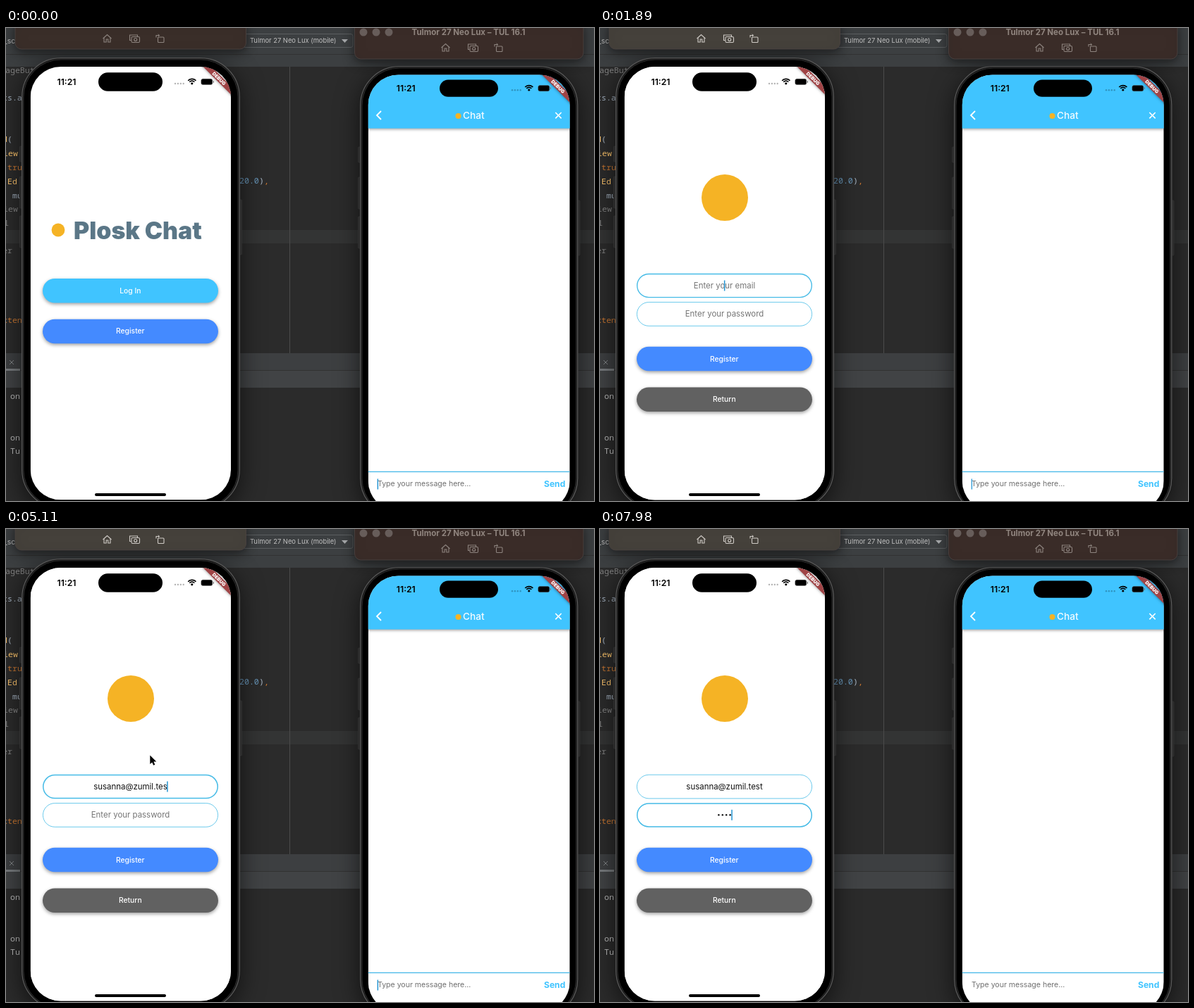
Write an HTML page with a canvas that moves like this. It is 834 px wide and 672 px high and loops after 8000 ms.

```html
<!DOCTYPE html>
<html lang="en">
<head>
<meta charset="utf-8">
<title>Sign-up demo</title>
<style>
html, body { margin: 0; width: 100%; height: 100%; overflow: hidden; background: #2b2b2b; }
canvas { display: block; }
</style>
</head>
<body>
<canvas id="stage" width="834" height="672"></canvas>
<script>
const ctx = document.getElementById('stage').getContext('2d');
const LOOP = 8000, STEP = 70;
const SANS = 'Inter, sans-serif', MONO = '"Noto Sans Mono", monospace';
const SKY = '#40c4ff', BLUE = '#448aff', GREY = '#616161', HINT = '#757575';
const EDGE = '#46bbe6', CARET = '#2495d3', LOGO = '#f5b325';

const DEVICE = 'Tulmor 27 Neo Lux';
const EMAIL = 'susanna@zumil.test';
const EMAIL_KEYS = [2380, 2520, 2660, 2870, 3010, 3290, 3360, 3710, 4060,
  4200, 4340, 4480, 4690, 4900, 4970, 5040, 5110, 5880];
const PASS_KEYS = [7210, 7420, 7700, 7840];
const PRESS = 700, FOCUS_EMAIL = 1750, FOCUS_PASS = 6720;

const clamp = v => Math.max(0, Math.min(1, v));
const ramp = (t, start, span) => clamp((t - start) / span);
const mix = (a, b, p) => a + (b - a) * p;

function bezier(x1, y1, x2, y2) {
  const at = (a, b, s) => 3 * (1 - s) ** 2 * s * a + 3 * (1 - s) * s * s * b + s ** 3;
  return x => {
    let lo = 0, hi = 1;
    for (let i = 0; i < 24; i++) {
      const mid = (lo + hi) / 2;
      if (at(x1, x2, mid) < x) lo = mid; else hi = mid;
    }
    return at(y1, y2, lo);
  };
}
const slideEase = bezier(.35, .91, .33, .97);
const heroEase = bezier(.4, 0, .2, 1);

// Blink cycle: steady, fade out, dark, fade in
function blink(dt) {
  const p = dt % 1065;
  if (p < 510) return 1;
  return p < 875 ? 1 - ramp(p, 510, 120) : ramp(p, 875, 125);
}

function rect(x, y, w, h, color) {
  ctx.fillStyle = color;
  ctx.fillRect(x, y, w, h);
}
function round(x, y, w, h, r, fill, stroke, line = 1) {
  ctx.beginPath();
  ctx.roundRect(x, y, w, h, r);
  if (fill) { ctx.fillStyle = fill; ctx.fill(); }
  if (stroke) { ctx.strokeStyle = stroke; ctx.lineWidth = line; ctx.stroke(); }
}
function disc(x, y, r, color) {
  ctx.beginPath();
  ctx.arc(x, y, r, 0, Math.PI * 2);
  ctx.fillStyle = color;
  ctx.fill();
}
function path(points, color, line, close) {
  ctx.beginPath();
  points.forEach(([x, y]) => ctx.lineTo(x, y));
  if (close) ctx.closePath();
  ctx.strokeStyle = color;
  ctx.lineWidth = line;
  ctx.stroke();
}
// y is the middle of the capitals
function text(str, x, y, size, color, weight = 400, align = 'center', family = SANS) {
  ctx.font = `${weight} ${size}px ${family}`;
  ctx.textAlign = align;
  ctx.fillStyle = color;
  ctx.fillText(str, x, y + size * .36);
}
function shaded(color, blur, dy, draw) {
  ctx.save();
  ctx.shadowColor = color;
  ctx.shadowBlur = blur;
  ctx.shadowOffsetY = dy;
  draw();
  ctx.restore();
}

function code(str, x, y, color) {
  text(str, x, y, 11.6, color, 400, 'left', MONO);
}

function drawEditor() {
  rect(0, 0, 834, 672, '#2b2b2b');
  rect(0, 0, 834, 55, '#3c3f41');
  rect(0, 37, 834, 1, '#323232');
  rect(0, 287, 834, 19, '#333434');
  rect(402, 55, 1, 407, '#4b4b4b');
  rect(0, 462, 834, 24, '#3d3f41');
  rect(0, 486, 834, 1, '#323232');
  rect(0, 487, 834, 24, '#414345');
  round(336, 8.5, 156, 19, 3, '#3c3f41', '#5b5e60');
  text(DEVICE + ' (mobile)', 346, 18, 9.4, '#c0c0c0', 400, 'left');
  ctx.beginPath();
  ctx.moveTo(476, 16);
  ctx.lineTo(485, 16);
  ctx.lineTo(480.5, 21);
  ctx.fillStyle = '#a5a7a9';
  ctx.fill();

  const plain = '#a9b7c6', dim = '#808080', gold = '#ffc66d', orange = '#cc7832';
  text('_sc', -3, 18, 10.5, '#bbbbbb', 400, 'left');
  code('ageBut', -1, 60, dim);
  code('ts.ad', -5, 99, plain);
  code('d', -5, 158, gold);
  code('(', 2, 158, plain);
  code('iew', -4, 178, gold);
  code('tru', 2, 198, orange);
  code('Ed', 2, 218, gold);
  code('mu', 9, 238, plain);
  code('iew', -4, 257, dim);
  code('l', -3, 277, dim);
  code('er', -5, 316, dim);
  code('xten', -5, 415, orange);
  code('20.0', 331, 217, '#6897bb');
  code(')', 359, 217, plain);
  code(',', 366, 217, orange);
  path([[5, 472], [11, 478]], '#808486', 1);
  path([[11, 472], [5, 478]], '#808486', 1);
  rect(0, 484, 20, 3, '#777b7e');
  code('on', 6, 523, '#bbbbbb');
  code('on', 6, 582, '#bbbbbb');
  code('Tu', 6, 601, '#bbbbbb');
}

function toolIcons([a, b, c], y, color) {
  path([[a - 6, y], [a, y - 5.5], [a + 6, y]], color, 1.1);
  path([[a - 4.5, y - 1], [a - 4.5, y + 5], [a - 1.3, y + 5], [a - 1.3, y + 1], [a + 1.3, y + 1],
    [a + 1.3, y + 5], [a + 4.5, y + 5], [a + 4.5, y - 1]], color, 1.1);
  path([[b - 5, y + 2.5], [b - 7, y + 2.5], [b - 7, y - 5], [b + 4, y - 5], [b + 4, y - 3]], color, 1.1);
  round(b - 4.5, y - 2.5, 11.5, 8, 1.5, null, color, 1.1);
  ctx.beginPath();
  ctx.arc(b + 1.2, y + 1.5, 2, 0, 7);
  ctx.stroke();
  round(c - 2.5, y - 2, 8.5, 7.5, 1, null, color, 1.1);
  path([[c - 5, y - 1.5], [c - 5, y - 4.5], [c - .5, y - 4.5]], color, 1.1);
  path([[c - 2.2, y - 6.3], [c - .4, y - 4.5], [c - 2.2, y - 2.7]], color, 1);
}

function drawToolbars(active) {
  const frame = (x, w, h, fill) => shaded('rgba(0,0,0,.55)', 16, 4, () =>
    round(x, -10, w, h + 10, 9, fill, '#4d4542', .8));
  frame(13, 327.5, 30, active ? '#45413b' : '#3a2e29');
  toolIcons([143.5, 182.5, 218], 15, active ? '#cfcbc6' : '#8d847f');
  frame(494.5, 324.5, 44, '#3a2c28');
  for (const x of [507, 525, 543]) disc(x, 6, 5.5, '#675d5a');
  text(DEVICE + ' – TUL 16.1', 656, 6, 11.5, '#90857f', 700);
  toolIcons([623.5, 662.5, 698], 28, '#8d847f');
}

function drawBody(x, y, w, sideY) {
  const key = (kx, ky, h) => round(kx, ky, 3, h, 1, '#3b3b3b', '#505050', .5);
  [[0, 22], [43, 45], [99, 45]].forEach(([dy, h]) => key(x - 2.5, sideY + dy, h));
  key(x + w - .5, sideY + 76, 78);
  shaded('rgba(0,0,0,.6)', 34, 8, () => round(x, y, w, 642, 56, '#1b1b1b'));
  round(x + .7, y + .7, w - 1.4, 640, 55, null, '#5c5c5c', 1.2);
  round(x + 3, y + 3, w - 6, 636, 53, '#000', '#333', .8);
}

function inScreen(x, y, w, h, draw) {
  ctx.save();
  ctx.beginPath();
  ctx.roundRect(x, y, w, h, 43);
  ctx.clip();
  rect(x, y, w, h, '#fff');
  draw();
  banner(x + w, y);
  ctx.restore();
}

function banner(x, y) {
  ctx.save();
  ctx.translate(x, y);
  ctx.rotate(Math.PI / 4);
  shaded('rgba(0,0,0,.5)', 4, 0, () => rect(-32, 19.7, 64, 8.2, '#a04446'));
  text('DEBUG', 0, 23.8, 6.8, '#fff', 900);
  ctx.restore();
}

function statusBar(clockX, y, islandX, islandW, dotsX, dotColor) {
  const islandH = islandW * .291;
  text('11:21', clockX, y, 12.2, '#000', 600);
  round(islandX, y - islandH / 2, islandW, islandH, islandH / 2, '#000');
  for (let i = 0; i < 4; i++) disc(dotsX + i * 3.9, y + 2.5, 1.2, dotColor);
  const wx = dotsX + 23.8, wy = y + 3.5;
  ctx.strokeStyle = '#000';
  ctx.lineWidth = 1.7;
  for (const r of [4.8, 7.6]) {
    ctx.beginPath();
    ctx.arc(wx, wy, r, -Math.PI * .76, -Math.PI * .24);
    ctx.stroke();
  }
  disc(wx, wy - 1.2, 1.6, '#000');
  round(wx + 13, y - 4.2, 16, 8.2, 2.5, '#000', 'rgba(90,90,90,.5)', .8);
  rect(wx + 30, y - 1.6, 1.2, 3, '#777');
}

function button(label, y, color, glow = 0) {
  shaded('rgba(0,0,0,.38)', 5, 2, () => round(52, y, 249, 34.5, 17.25, color));
  if (glow) round(52, y, 249, 34.5, 17.25, `rgba(255,255,255,${glow})`);
  text(label, 176.3, y + 17, 10.3, '#fff', 500);
}

// The outline lies fully inside the field's box
function field(y, focus) {
  const line = mix(.8, 1.5, focus);
  round(52 + line / 2, y + line / 2, 249 - line, 34.5 - line, 17, '#fff', EDGE, line);
}

function caret(x, y, alpha) {
  if (alpha <= 0) return;
  ctx.globalAlpha = alpha;
  rect(x - .6, y - 7.5, 1.5, 15, CARET);
  ctx.globalAlpha = 1;
}

function homePage(t) {
  text('Plosk Chat', 96, 288, 33.9, '#5b7787', 900, 'left');
  button('Log In', 356, SKY);
  button('Register', 413.7, BLUE, .11 * ramp(t, PRESS, 200));
}

function formPage(t) {
  const toPass = ramp(t, FOCUS_PASS, 170);
  const typed = EMAIL_KEYS.filter(k => k <= t);
  const dots = PASS_KEYS.filter(k => k <= t);
  const mid = 176.5, size = 11.45;

  field(348.8, ramp(t, FOCUS_EMAIL, 170) * (1 - toPass));
  let end = mid;
  if (typed.length) {
    const str = EMAIL.slice(0, typed.length);
    text(str, mid, 365.5, size, '#111');
    end += ctx.measureText(str).width / 2;
  } else {
    text('Enter your email', mid, 365.5, size, HINT);
  }
  if (t >= FOCUS_EMAIL && t < FOCUS_PASS) {
    caret(end, 366, blink(t - (typed.at(-1) ?? FOCUS_EMAIL - 20)));
  }

  field(389.2, toPass);
  const gap = 5.4, half = dots.length * gap / 2;
  if (!dots.length) text('Enter your password', mid, 406, size, HINT);
  dots.forEach((_, i) => disc(mid - half + gap * (i + .5), 406.3, 1.2, '#111'));
  if (t >= FOCUS_PASS + 70) {
    caret(mid + half - .4, 406.3, blink(t - (dots.at(-1) ?? FOCUS_PASS + 70)));
  }

  button('Register', 452.8, BLUE);
  button('Return', 510.5, GREY);
}

function drawSignup(t) {
  const slide = slideEase(ramp(t, 850, 450));
  const grow = heroEase(ramp(t, 890, 450));
  const left = 34.7, width = 284.3;
  drawBody(22, 42, 310, 168);
  inScreen(left, 55, width, 615.5, () => {
    if (slide < .999) {
      ctx.save();
      ctx.translate(-width / 3 * slide, 0);
      homePage(t);
      ctx.restore();
    }
    if (slide > 0) {
      ctx.save();
      ctx.translate(width * (1 - slide), 0);
      rect(left, 55, width, 616, '#fff');
      formPage(t);
      ctx.restore();
    }
    // The logo flies along an arc between the pages
    const arc = Math.sin(grow * Math.PI / 2);
    disc(mix(74, 177, arc), mix(287, 241, grow), mix(9.4, 33, grow), LOGO);
  });
  statusBar(86, 76.5, 131, 91, 240, '#b5b5b5');
  round(126, 661, 101, 4, 2, '#000');
}

function drawChat(t) {
  drawBody(502, 54, 309.5, 169);
  inScreen(513.7, 66.4, 286, 620, () => {
    shaded('rgba(0,0,0,.38)', 4, 1.5, () => rect(513, 66, 288, 76.6, SKY));
    path([[532, 118], [526, 124], [532, 130]], '#fff', 1.8);
    disc(641.5, 125, 4, LOGO);
    text('Chat', 648, 124.5, 13.7, '#f4fbff', 500, 'left');
    path([[779.3, 120], [787.7, 128.4]], '#fff', 1.6);
    path([[787.7, 120], [779.3, 128.4]], '#fff', 1.6);
    rect(513, 629.8, 288, 1.3, '#45b8e8');
    text('Type your message here...', 527, 647.3, 10.55, '#707070', 400, 'left');
    text('Send', 763, 647.3, 12.1, SKY, 700, 'left');
    caret(527.2, 648, blink(t + 160));
  });
  statusBar(567.3, 85.7, 615, 83, 718, '#2f93bf');
}

function drawPointer(x, y) {
  const shape = [[0, 0], [0, 12.5], [2.9, 9.9], [4.9, 14.2], [7, 13.2], [5.1, 9.1], [9, 9]];
  const pts = shape.map(([px, py]) => [x + px, y + py]);
  ctx.lineJoin = 'round';
  path(pts, '#fff', 2, true);
  ctx.fillStyle = '#000';
  ctx.fill();
  ctx.lineJoin = 'miter';
}

function draw(t) {
  drawEditor();
  drawSignup(t);
  drawChat(t);
  drawToolbars(t >= PRESS);
  if (t >= 3640 && t < 6090) drawPointer(204.3, 321.5);
}

const begin = performance.now();
function tick() {
  const t = (performance.now() - begin) % LOOP;
  draw(Math.floor(t / STEP) * STEP);
  requestAnimationFrame(tick);
}
tick();
</script>
</body>
</html>
```
